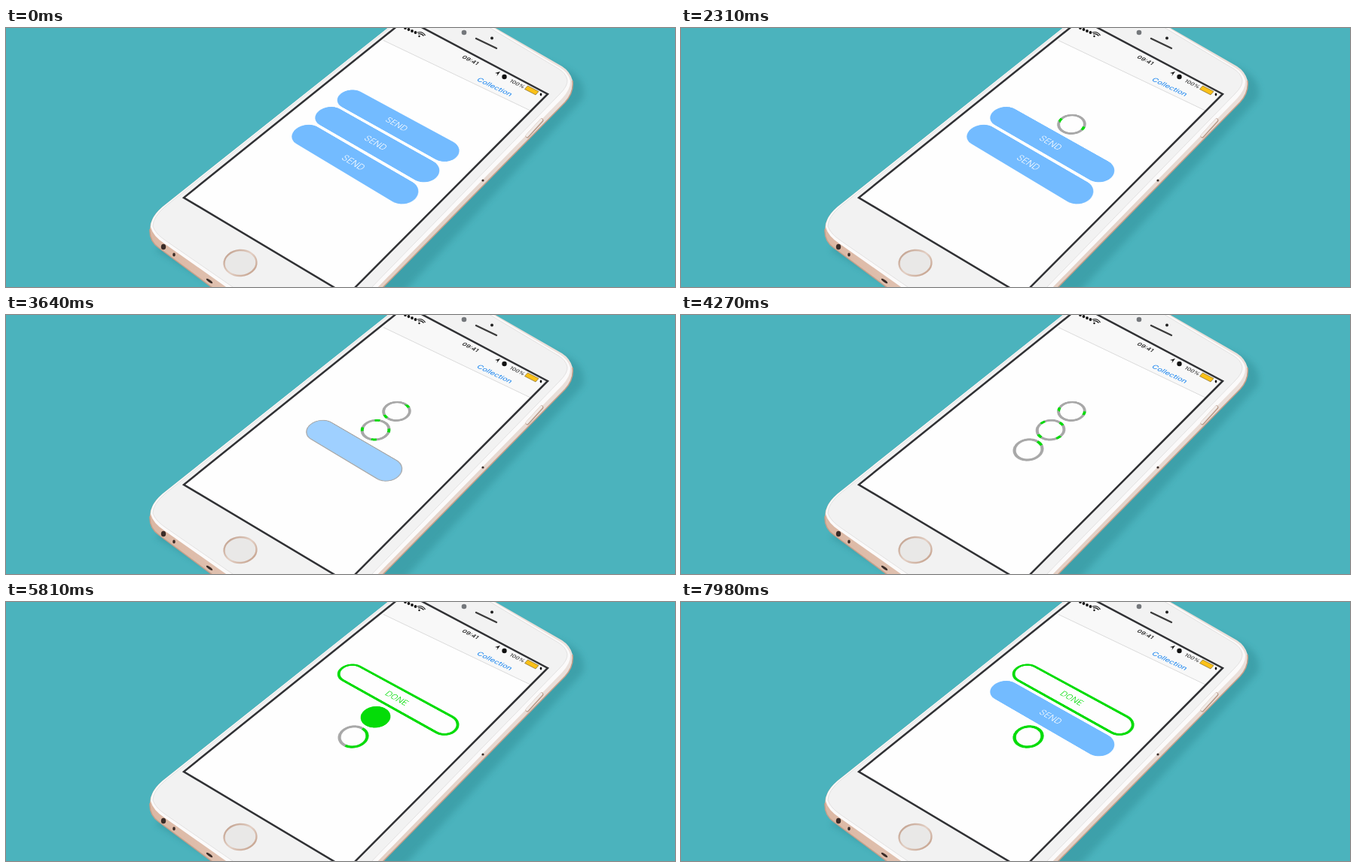
Recreate the animation shown at these times as an HTML page. Size 888x345 px, loop 8 s.

```html
<!DOCTYPE html>
<html lang="en">
<head>
<meta charset="utf-8">
<title>Send buttons</title>
<style>
  html, body { margin: 0; width: 100%; height: 100%; overflow: hidden; background: #4bb3bd; }
  #stage { position: relative; width: 888px; height: 345px; overflow: hidden; }
  #stage > svg { position: absolute; left: 0; top: 0; }
  #pad { position: absolute; left: 0; top: 0; width: 248px; height: 134px; transform-origin: 0 0; }
  #pad svg { display: block; overflow: visible; }
  text { font-family: Inter, "Liberation Sans", sans-serif; text-anchor: middle; }
</style>
</head>
<body>
<div id="stage">
  <svg width="888" height="345" viewBox="0 0 888 345">
    <defs>
      <filter id="soft" x="-10%" y="-10%" width="120%" height="120%"><feGaussianBlur stdDeviation="4"/></filter>
      <linearGradient id="rim" gradientUnits="userSpaceOnUse" x1="192" y1="270" x2="752" y2="80">
        <stop offset="0" stop-color="#dcb8a4"/><stop offset=".3" stop-color="#e6cfc2"/>
        <stop offset=".6" stop-color="#e4d2c8"/><stop offset="1" stop-color="#ebe1dc"/>
      </linearGradient>
      <linearGradient id="ring" x1="0" y1="0" x2="1" y2="1">
        <stop offset="0" stop-color="#bd9a86"/><stop offset=".5" stop-color="#e3d0c5"/><stop offset="1" stop-color="#c09a84"/>
      </linearGradient>
    </defs>

    <!-- body -->
    <path d="M600 0L738 52Q772 66 766 94L528 352H290L198 296Z" fill="#2b8790" opacity=".42" filter="url(#soft)"/>
    <path d="M508 -1L208 238Q190 253 191 270Q190 284 203 293L282 352H494L742 99Q754 86 752 70Q749 58 738 51L648 -1Z" fill="url(#rim)"/>
    <path d="M191 268Q190 284 203 293L282 352M494 352L742 99Q754 86 752 70" fill="none" stroke="#c59f8a" stroke-width="1.500"/>
    <path d="M508 -1L208 238Q192 252 192 265Q195 277 210 287L302 352H487L738 94Q750 81 749 70Q746 59 736 53L646 -1Z" fill="#fbfafa"/>
    <path d="M510 -1L211 238Q195 252 195 264Q198 274 213 284L311 352H479L735 88Q746 77 745 69Q743 60 733 54L641 -1Z" fill="#f2f2f2" stroke="#dedcdc" stroke-width=".8"/>
    <path d="M711 123L692 144" stroke="#b99a89" stroke-width="5" stroke-linecap="round"/>
    <path d="M710.500 122.500L691.500 143.500" stroke="#f1ebe8" stroke-width="3.400" stroke-linecap="round"/>
    <g fill="#3a2c28">
      <circle cx="633" cy="203" r="1.600"/>
      <ellipse cx="209" cy="291.500" rx="3.200" ry="3.800"/>
      <ellipse cx="223" cy="302" rx="1.800" ry="2.400"/>
      <ellipse cx="270" cy="337" rx="5" ry="1.600" transform="rotate(36 270 337)"/>
    </g>
    <ellipse cx="311" cy="313" rx="21.500" ry="17" fill="#e9e8e7" stroke="url(#ring)" stroke-width="2.400" transform="rotate(-4 311 313)"/>
    <circle cx="608" cy="6" r="3.300" fill="#74777b"/>
    <circle cx="645" cy="13.500" r="2" fill="#222"/>
    <path d="M624 14L651 27" stroke="#3b3b3b" stroke-width="2.400" stroke-linecap="round"/>

    <!-- screen -->
    <path d="M531 -12L719 88L453 356L236 226Z" fill="#fefefe"/>
    <path d="M531 -11L718 88L698 111L501 16.500Z" fill="#f8f8f8"/>
    <path d="M501 16.500L698 111" stroke="#d2d2d2" stroke-width=".8"/>
    <path d="M531 -12L719 88L453 356L236 226Z" fill="none" stroke="#303134" stroke-width="2.500"/>
    <g fill="#111">
      <circle cx="530" cy="0" r="1.900"/><circle cx="534.500" cy="2" r="1.900"/>
      <circle cx="539" cy="4" r="1.900"/><circle cx="543.500" cy="6" r="1.900"/>
      <circle cx="548.500" cy="11" r="1.200"/>
      <path d="M656 58L649 60L652.500 60.800L651.500 64Z"/>
      <circle cx="661.500" cy="65" r="3.200"/>
      <text transform="matrix(.55 .27 -.38 .34 614.500 44.500)" font-size="14" font-weight="500">09:41</text>
      <text transform="matrix(.55 .27 -.38 .34 677 76)" font-size="13">100%</text>
      <ellipse cx="710" cy="88.500" rx="1.300" ry="2"/>
    </g>
    <path d="M547 8Q551 6.500 554.500 10.500M546 6Q553 4 556.500 10" fill="none" stroke="#111" stroke-width="1.200"/>
    <path d="M692.500 77L707 84.500L703 89L688.500 81.500Z" fill="#fbc117" stroke="#8d7738" stroke-width=".8"/>
    <text transform="matrix(.56 .265 -.38 .34 646.500 80.500)" font-size="17" fill="#0f7fef">Collection</text>
  </svg>
  <div id="pad"><svg id="art" width="248" height="134"></svg></div>
</div>
<script>
const LOOP = 8000, STEP = 70, W = 248, H = 134, R = 30, LINE = 6;
const BLUE = [115, 187, 255], WHITE = [254, 254, 254], GREY = [168, 168, 168], GREEN = [4, 220, 8];

// Projects the flat button pad onto the tilted screen.
function project(el, [x0, y0], [x1, y1], [x2, y2], [x3, y3]) {
  const ax = x1 - x2, ay = y1 - y2, bx = x3 - x2, by = y3 - y2;
  const sx = x0 - x1 + x2 - x3, sy = y0 - y1 + y2 - y3, det = ax * by - bx * ay;
  const g = (sx * by - bx * sy) / det, h = (ax * sy - sx * ay) / det;
  const m = [(x1 - x0 + g * x1) / W, (y1 - y0 + g * y1) / W, 0, g / W,
             (x3 - x0 + h * x3) / H, (y3 - y0 + h * y3) / H, 0, h / H,
             0, 0, 1, 0, x0, y0, 0, 1];
  el.style.transform = `matrix3d(${m.map(v => v.toFixed(8))})`;
}
project(document.getElementById('pad'), [458.6, 95], [582, 163.2], [526.5, 218], [399.5, 142.8]);

const ramp = (t, from, span) => Math.min(1, Math.max(0, (t - from) / span));
const ease = x => x * x * (3 - 2 * x);
const mix = (a, b, k) => a.map((v, i) => v + (b[i] - v) * k);
const rgb = c => `rgb(${c.map(Math.round)})`;

function spring(ms) {
  if (ms <= 0) return 0;
  const s = ms / 1000;
  return 1 - Math.exp(-4.3 * s) * Math.cos(9 * s);
}

function add(tag, attrs) {
  const el = document.createElementNS('http://www.w3.org/2000/svg', tag);
  set(el, attrs);
  return document.getElementById('art').appendChild(el);
}
function set(el, attrs) {
  for (const k in attrs) el.setAttribute(k, attrs[k]);
}

// arcs: number of spinning dashes, 0 for a ring that fills up
const DASH = 22;
const buttons = [
  { start: 1422, done: 4660, arcs: 2, turn: 22 - 3150 * .36 },
  { start: 2925, done: 5550, arcs: 4, turn: 57 - 3640 * .36 },
  { start: 3453, done: 7800, arcs: 0, turn: 0 }
].map((b, i) => {
  const cy = i * H / 2;
  return {
    ...b, cy,
    pill: add('rect', {}),
    arc: add('circle', { cx: W / 2, cy, r: R - LINE / 2, fill: 'none', stroke: rgb(GREEN), 'stroke-width': LINE, pathLength: 360 }),
    label: add('text', { x: W / 2, y: cy + 7, 'font-size': 19.5, 'font-weight': 300 })
  };
});

function drawPill(b, stretch, fill, stroke, line) {
  const w = W * stretch + 2 * R - line, r = R - line / 2;
  set(b.pill, {
    x: W / 2 - w / 2, y: b.cy - r, width: w, height: 2 * r, rx: r,
    fill: rgb(fill), stroke: rgb(stroke), 'stroke-width': line
  });
}

function drawLabel(b, text, color, opacity) {
  b.label.textContent = text;
  set(b.label, { fill: rgb(color), opacity });
}

function drawArc(b, t) {
  const ready = b.start + 520, on = t >= ready && t < b.done + 200;
  b.arc.style.display = on ? '' : 'none';
  if (!on) return;
  const turn = b.arcs ? b.turn + t * .36 - DASH / 2 : 0;
  const full = 360 * ramp(t, ready, b.done - ready);
  const dash = b.arcs ? `${DASH} ${360 / b.arcs - DASH}` : `${full} 400`;
  set(b.arc, { 'stroke-dasharray': dash, transform: `rotate(${turn - 90} ${W / 2} ${b.cy})` });
}

function draw(t) {
  buttons.forEach((b, i) => {
    const p = ease(ramp(t, b.start, 500)), q = ramp(t, b.done, 260);
    let stretch = 1 - p, line = LINE * p;
    let fill = mix(BLUE, WHITE, p), stroke = mix(GREY, GREEN, q);
    drawLabel(b, 'SEND', WHITE, 1 - ramp(t, b.start, 110));

    if (i === 0 && q) {
      stretch = t < 5880 ? spring(t - 4945) : 1;
      fill = mix(mix(WHITE, GREEN, q), WHITE, ramp(t, 5150, 400));
      drawLabel(b, 'DONE', GREEN, ramp(t, 5250, 350));
    } else if (i === 1 && q) {
      const back = ramp(t, 6700, 560);
      stretch = ease(ramp(t, 6290, 600));
      fill = mix(mix(WHITE, GREEN, q), BLUE, back);
      stroke = mix(stroke, BLUE, back);
      drawLabel(b, 'SEND', WHITE, ramp(t, 7000, 400));
    } else if (i === 2) {
      stroke = t < b.done ? GREY : GREEN;
    }
    drawPill(b, stretch, fill, stroke, line);
    drawArc(b, t);
  });
}

const begin = performance.now();
function tick() {
  const t = (performance.now() - begin) % LOOP;
  draw(Math.floor(t / STEP) * STEP);
  requestAnimationFrame(tick);
}
tick();
</script>
</body>
</html>
```
